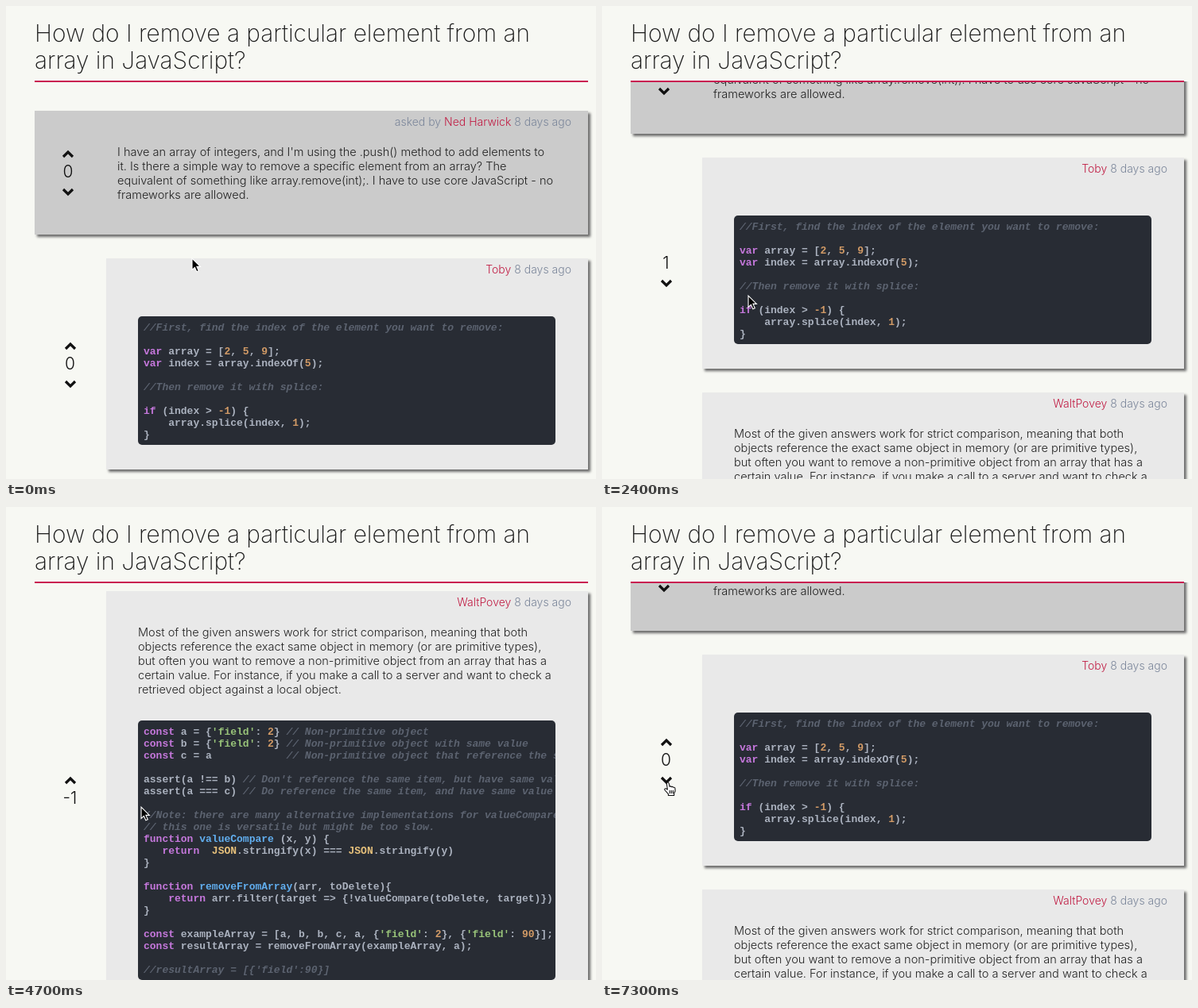
Recreate the animation shown at these times as an HTML page. Size 742 by 596 pixels, loop 7.4 s.

```html
<!DOCTYPE html>
<html lang="en">
<head>
<meta charset="utf-8">
<title>Question thread</title>
<style>
  html, body { margin: 0; width: 100%; height: 100%; overflow: hidden; background: #f7f8f3; }
  body { position: relative; color: #222; font: 300 14.56px/18px Inter, sans-serif; font-optical-sizing: none; }
  body * { position: absolute; box-sizing: border-box; white-space: pre; }
  h1 { margin: 0; left: 36px; top: 17px; font-size: 29.8px; font-weight: 200; line-height: 34px; color: #1c1c1c; }
  hr { margin: 0; border: 0; left: 36px; top: 94px; width: 696px; height: 2px; background: #c91c51; }
  #view { inset: 95px 0 0; overflow: hidden; }
  #page { top: -95px; left: 0; width: 742px; }
  .card { background: #e9e9e9; box-shadow: 3px 3px 3px #6c6c6c; }
  .question { background: #cbcbcb; }
  .meta { right: 21px; top: 5px; font-size: 14px; color: #7c879b; }
  .meta b { position: static; font-weight: 300; color: #c01d44; }
  pre { margin: 0; padding: 7px 7px 5px; left: 166px; width: 525px; overflow: hidden; border-radius: 5px;
        background: #282c34; color: #abb2bf; font: bold 13px/15px "Liberation Mono", monospace; }
  pre span { position: static; }
  .comment { color: #5c6370; font-style: italic; }
  .string { color: #98c379; }
  .keyword { color: #c678dd; }
  .number { color: #d19a66; }
  .title { color: #61aeef; }
  .builtin { color: #e6c07b; }
  .vote { width: 40px; height: 70px; }
  .vote svg { left: 12px; width: 16px; height: 12px; }
  .vote .up { top: 7px; }
  .vote .down { top: 53.5px; }
  .vote div { width: 40px; top: 23px; line-height: 24px; font-size: 21px; text-align: center; color: #111; }
  .vote path { fill: none; stroke: #111; stroke-width: 3.2; }
  #cursor { left: 0; top: 0; width: 24px; height: 26px; overflow: visible; }
</style>
</head>
<body>
<div id="view"><div id="page"></div></div>
<h1>How do I remove a particular element from an
array in JavaScript?</h1>
<hr>
<svg id="cursor">
  <path id="arrow" d="M0 0V14.5L3.4 11.4L5.8 16.8L8.3 15.7L5.9 10.4H10.4Z" fill="#000" stroke="#fff" stroke-width="1.1"/>
  <path id="beam" d="M-3 -6Q0 -6 0 -4Q0 -6 3 -6M0 -4V6M-3 8Q0 8 0 6Q0 8 3 8M-1.5 3H1.5" fill="none" stroke="#8d929b"/>
  <path id="hand" d="M-1.7 1.3Q-1.7 0 -.3 0Q1 0 1.2 1.3L2 5.3Q3.4 4.3 4.3 5.7Q5.7 4.8 6.6 6.3Q8.7 5.7 9 8V11L7.6 14V16.5H.4V14.7L-4.2 9.5Q-4.7 7.5 -2.6 7.8L-.6 9ZM2.2 10V14M4.3 10V14M6.4 10V14"
        fill="#fff" stroke="#111" stroke-width="1.1" stroke-linejoin="round"/>
</svg>
<script>
const LOOP = 7400, STEP = 100;
const page = document.getElementById('page');
const cursor = document.getElementById('cursor');

const firstSnippet = `//First, find the index of the element you want to remove:

var array = [2, 5, 9];
var index = array.indexOf(5);

//Then remove it with splice:

if (index > -1) {
    array.splice(index, 1);
}`;

const secondSnippet = `const a = {'field': 2} // Non-primitive object
const b = {'field': 2} // Non-primitive object with same value
const c = a            // Non-primitive object that reference the same

assert(a !== b) // Don't reference the same item, but have same value
assert(a === c) // Do reference the same item, and have same value

//Note: there are many alternative implementations for valueCompare
// this one is versatile but might be too slow.
function valueCompare (x, y) {
   return  JSON.stringify(x) === JSON.stringify(y)
}

function removeFromArray(arr, toDelete){
    return arr.filter(target => {!valueCompare(toDelete, target)})
}

const exampleArray = [a, b, b, c, a, {'field': 2}, {'field': 90}];
const resultArray = removeFromArray(exampleArray, a);

//resultArray = [{'field':90}]`;

const question = `I have an array of integers, and I'm using the .push() method to add elements to
it. Is there a simple way to remove a specific element from an array? The
equivalent of something like array.remove(int);. I have to use core JavaScript - no
frameworks are allowed.`;

const answer = `Most of the given answers work for strict comparison, meaning that both
objects reference the exact same object in memory (or are primitive types),
but often you want to remove a non-primitive object from an array that has a
certain value. For instance, if you make a call to a server and want to check a
retrieved object against a local object.`;

function highlight(code) {
  const token = /(?<comment>\/\/.*)|(?<string>'[^']*')|(?<keyword>\b(?:var|const|if|function|return)\b)|(?<number>-?\b\d+)|(?<title>(?<=function )\w+)|(?<builtin>JSON)/g;
  const escape = text => text.replace(/&/g, '&amp;').replace(/</g, '&lt;');
  return escape(code).replace(token, (match, ...rest) => {
    const kind = Object.entries(rest.at(-1)).find(([, text]) => text)[0];
    return `<span class="${kind}">${match}</span>`;
  });
}

function add(tag, className, style, html) {
  const node = document.createElement(tag);
  node.className = className;
  node.style.cssText = style;
  node.innerHTML = html;
  return page.appendChild(node);
}

function addCard(className, left, top, height, author, prefix = '') {
  add('div', 'card ' + className, `left:${left}px;top:${top}px;width:${732 - left}px;height:${height}px`,
    `<div class="meta">${prefix}<b>${author}</b> 8 days ago</div>`);
}

function addVote(x, y) {
  const chevron = (name, d) => `<svg class="${name}"><path d="${d}"/></svg>`;
  const node = add('div', 'vote', `left:${x - 20}px;top:${y - 35}px`,
    chevron('up', 'M2 9L8 3L14 9') + '<div>0</div>' + chevron('down', 'M2 3L8 9L14 3'));
  const [up, count, down] = node.children;
  return value => {
    count.textContent = value;
    up.style.display = value > 0 ? 'none' : '';
    down.style.display = value < 0 ? 'none' : '';
  };
}

addCard('question', 36, 132, 156, 'Ned Harwick', 'asked by ');
add('div', '', 'left:140px;top:175px', question);
addVote(78, 209);

addCard('', 126, 318, 266, 'Toby');
add('pre', '', 'top:391px;height:162px', highlight(firstSnippet));
const setFirstVote = addVote(80.5, 451);

addCard('', 126, 614, 520, 'WaltPovey');
add('div', '', 'left:166px;top:657px', answer);
add('pre', '', 'top:777px;height:327px', highlight(secondSnippet));
const setSecondVote = addVote(80.5, 875);

// Each scroll: start, end, distance. Quick start with a long glide.
const scrolls = [[100, 900, 126], [2393, 3600, 382], [4900, 6182, -376]];
// Cursor stops: time, x, y.
const stops = [
  [0, 234, 318], [1100, 234, 318], [1600, 82, 304], [1950, 82, 304], [2350, 184, 365],
  [3500, 184, 365], [4000, 82, 392], [4350, 82, 392], [4700, 170, 378], [4900, 196, 367],
  [6300, 196, 367], [6800, 83, 347], [LOOP, 83, 347]
];

const clamp = u => Math.min(1, Math.max(0, u));
const smooth = u => u * u * (3 - 2 * u);
const glide = u => smooth(Math.pow(u, 2 / 3));

function cursorAt(t) {
  const i = stops.findIndex(stop => stop[0] > t);
  const [t0, x0, y0] = stops[i - 1], [t1, x1, y1] = stops[i];
  const u = smooth((t - t0) / (t1 - t0));
  return [x0 + (x1 - x0) * u, y0 + (y1 - y0) * u];
}

function draw() {
  const t = Math.floor(performance.now() % LOOP / STEP) * STEP;
  const scroll = scrolls.reduce((sum, [from, to, distance]) =>
    sum + distance * glide(clamp((t - from) / (to - from))), 0);
  page.style.transform = `translateY(${-Math.round(scroll)}px)`;

  setFirstVote(t >= 1700 && t < 7100 ? 1 : 0);
  setSecondVote(t >= 4200 ? -1 : 0);

  const [x, y] = cursorAt(t);
  cursor.style.transform = `translate(${x}px,${y}px)`;
  const shape = x < 90 ? 'hand' : t >= 800 && t < 1300 ? 'beam' : 'arrow';
  for (const path of cursor.children) path.style.display = path.id === shape ? '' : 'none';
  requestAnimationFrame(draw);
}
draw();
</script>
</body>
</html>
```
